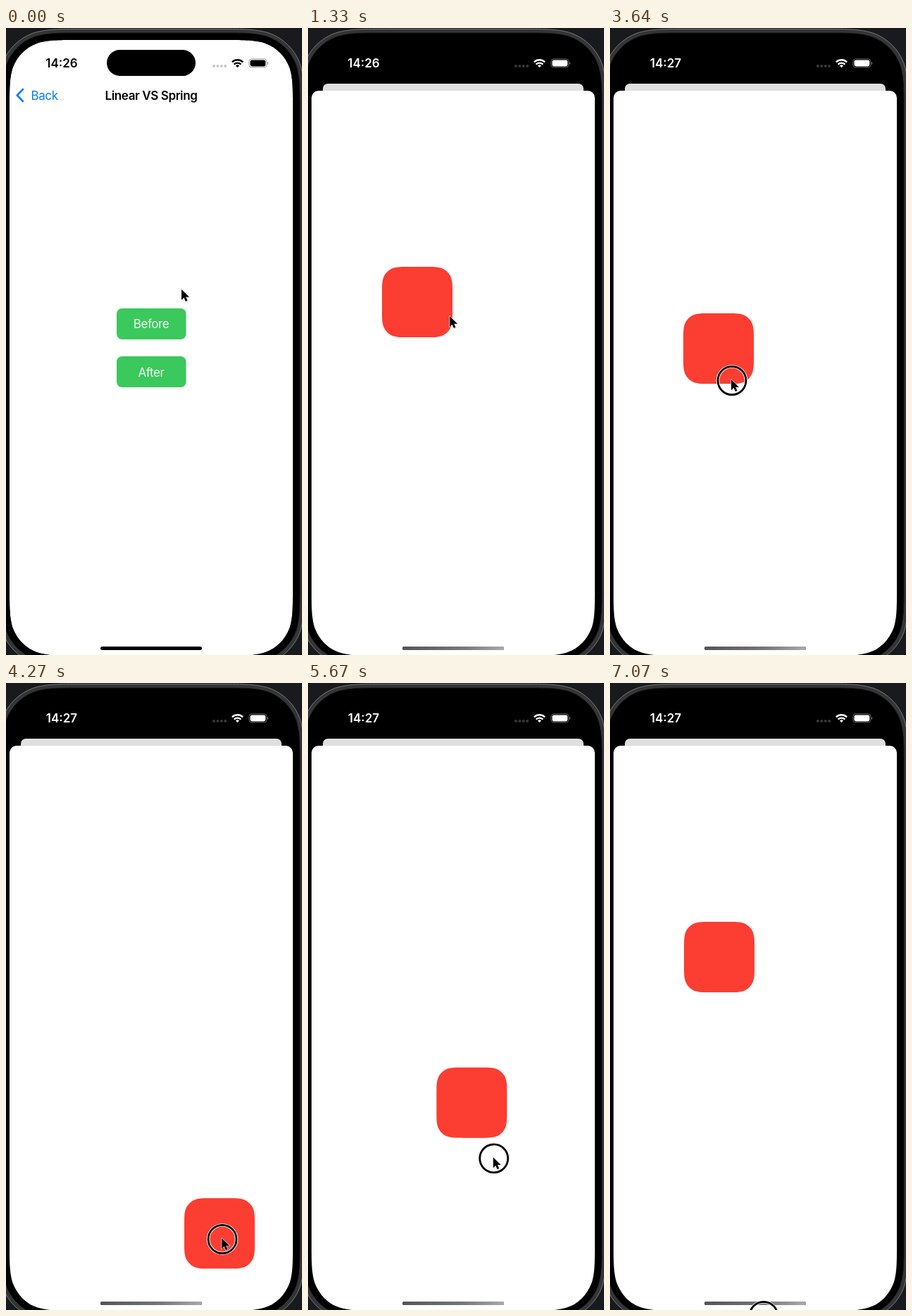
Animation, 420 px wide and 890 px high, one loop 7140 ms. Source, as an HTML page:

```html
<!DOCTYPE html>
<html lang="en">
<head>
<meta charset="utf-8">
<title>Linear VS Spring</title>
<style>
  html, body { margin: 0; width: 100%; height: 100%; overflow: hidden; background: #000; }
  svg { display: block; width: 420px; height: 890px; }
  text { font-family: Inter, Roboto, sans-serif; font-size: 17px; letter-spacing: -.4px; }
  .mid { text-anchor: middle; }
  .bold { font-weight: 600; }
</style>
</head>
<body>
<svg viewBox="0 0 420 890">
  <defs>
    <clipPath id="screenClip"><path id="screen"/></clipPath>
    <linearGradient id="barFill">
      <stop offset="0" stop-color="#555"/>
      <stop offset=".6" stop-color="#777"/>
      <stop offset="1" stop-color="#aaa"/>
    </linearGradient>
  </defs>

  <rect width="420" height="890" fill="#181a1e"/>
  <path id="frame" fill="#343536" stroke="#77797b"/>
  <path id="bezel" stroke="#151515"/>

  <g clip-path="url(#screenClip)">
    <rect width="420" height="890"/>
    <g id="page">
      <path id="pageBg" fill="#fff"/>
      <path d="M24 87L15.8 95.5L24 104" fill="none" stroke="#087cf5" stroke-width="2.6" stroke-linecap="round" stroke-linejoin="round"/>
      <text x="35.5" y="101.5" fill="#087cf5">Back</text>
      <text class="mid bold" x="206" y="101.5">Linear VS Spring</text>
      <rect x="157" y="398" width="98.5" height="44" rx="7.5" fill="#3bc85c"/>
      <rect x="157" y="466" width="98.5" height="44" rx="7.5" fill="#3bc85c"/>
      <g class="mid" fill="#fff" fill-opacity=".92">
        <text x="206" y="426">Before</text>
        <text x="206" y="494.5">After</text>
      </g>
      <path id="dim"/>
    </g>
    <rect x="143" y="31" width="126" height="37" rx="18.5"/>
    <g id="status">
      <text class="bold" id="clock" x="79" y="55.5" text-anchor="middle" style="letter-spacing:0"></text>
      <g opacity=".22">
        <circle cx="295" cy="54" r="2"/><circle cx="300.4" cy="54" r="2"/>
        <circle cx="305.8" cy="54" r="2"/><circle cx="311.2" cy="54" r="2"/>
      </g>
      <g fill="none" id="waves" stroke-width="2.3">
        <path d="M320.8 48.3a11.2 11.2 0 0 1 15.4 0"/>
        <path d="M323.6 51.6a7.2 7.2 0 0 1 9.8 0"/>
      </g>
      <path d="M328.5 56.2l-2.5-2.7a3.7 3.7 0 0 1 5 0z"/>
      <rect id="cell" x="344.9" y="43.9" width="25" height="12" rx="3.8" fill="none" stroke-opacity=".4"/>
      <rect x="346.5" y="45.4" width="21.8" height="9" rx="2.4"/>
      <path d="M371 48v4a2.2 2.2 0 0 0 0-4z" opacity=".45"/>
    </g>
    <g id="sheet">
      <path d="M5 99a10 10 0 0 1 10-10h382a10 10 0 0 1 10 10v802H5z" fill="#fff"/>
      <path id="box" fill="#fc3d32"/>
    </g>
    <rect x="134" y="878" width="144" height="5" rx="2.5"/>
    <rect id="bar" x="134" y="878" width="144" height="5" rx="2.5" fill="url(#barFill)"/>
  </g>

  <g id="pointer">
    <g id="ring" fill="none">
      <circle cx="1" cy="1.5" r="20" stroke="#fff" stroke-width="4.6"/>
      <circle cx="1" cy="1.5" r="20" stroke="#000" stroke-width="2.8"/>
    </g>
    <path d="M.8 1.2V16.4L4.4 13.1L6.8 18.3L9.6 17L7.3 12H12z" fill="#000" opacity=".2"/>
    <path d="M0 0V15L3.5 11.8L5.8 17L8.5 15.8L6.2 10.8H11z" stroke="#fff" stroke-width="1.1" paint-order="stroke"/>
  </g>
</svg>

<script>
const LOOP = 7140, STEP = 70, RETURN = 450, LAG = 70;
const HOME = [105, 339], GRAB = [49, 48];
const el = id => document.getElementById(id);
const clamp = v => Math.min(1, Math.max(0, v));
const mix = (a, b, u) => a + (b - a) * u;
const mix2 = (a, b, u) => [mix(a[0], b[0], u), mix(a[1], b[1], u)];

// Rectangle with continuous-curvature corners.
function smoothRect(x, y, w, h, r) {
  const half = [[1.5287, 0], [1.0885, 0], [.8684, 0], [.6315, .0749], [.3728, .1691]];
  const corner = half.concat(half.map(([a, b]) => [b, a]).reverse());
  const place = (fx, fy, pts) => pts.map(([a, b]) =>
    (fx ? x + w - a * r : x + a * r).toFixed(2) + ' ' + (fy ? y + h - b * r : y + b * r).toFixed(2));
  const back = corner.slice().reverse();
  return [[1, 0, corner], [1, 1, back], [0, 1, corner], [0, 0, back]]
    .map(([fx, fy, pts], i) => {
      const p = place(fx, fy, pts);
      return (i ? 'L' : 'M') + p[0] + 'C' + p.slice(1).join(' ');
    }).join('') + 'Z';
}

const linear = u => u;
const smooth = u => u * u * (3 - 2 * u);
const out = u => 1 - (1 - u) ** 1.5;

// Pointer stops: time, x, y, easing of the way there.
const stops = [
  [0, 249, 371], [100, 249, 371], [350, 217, 396, smooth],
  [520, 217, 396], [630, 201, 409, smooth], [1400, 201, 409],
  [2040, 226, 707, smooth], [2420, 226, 707], [3080, 166, 470, smooth],
  [3240, 122, 405], [3330, 135, 384], [3430, 150, 390, out], [3500, 150, 390],
  [3570, 153, 453], [3640, 172, 499], [4260, 306, 788, out],
  [5040, 306, 788], [5320, 155, 400, smooth], [5400, 155, 400],
  [5740, 276, 707, smooth], [5880, 299, 784, out],
  [6200, 299, 784], [6580, 217, 897, smooth], [LOOP, 217, 897]
];

function pointerAt(t) {
  const i = Math.max(1, stops.findIndex(s => s[0] >= t));
  const [t0, ...a] = stops[i - 1], [t1, x, y, ease = linear] = stops[i];
  return mix2(a, [x, y], ease(clamp((t - t0) / (t1 - t0))));
}

const drags = [[1400, 2320], [3540, 4455], [5400, 6042]];

function boxAt(t) {
  const drag = drags.filter(d => d[0] <= t).pop();
  if (!drag) return HOME;
  const [down, up] = drag;
  const p = pointerAt(Math.min(t, up) - LAG);
  const held = [p[0] - GRAB[0], p[1] - GRAB[1]];
  return t < up ? mix2(HOME, held, clamp((t - down) / 100))
                : mix2(held, HOME, clamp((t - up) / RETURN));
}

function sheetAt(t) {
  const s = Math.max(0, t - 690) * .0145;
  return t >= 1260 ? 1 : 1 - (1 + s) * Math.exp(-s);
}

function draw(t) {
  const p = sheetAt(t), [x, y] = pointerAt(t), [bx, by] = boxAt(t);
  const pressed = (t >= 630 && t < 700) || t >= 7070 || drags.some(d => t >= d[0] && t < d[1]);

  const page = smoothRect(5, 17, 402, 874, mix(62, 8, p));
  el('pageBg').setAttribute('d', page);
  el('dim').setAttribute('d', page);
  el('dim').setAttribute('opacity', .125 * p);
  el('page').setAttribute('transform',
    `translate(206 ${17 + 62 * p}) scale(${1 - .0796 * p}) translate(-206 -17)`);

  const g = Math.round(255 * p), ink = `rgb(${g},${g},${g})`;
  el('status').setAttribute('fill', ink);
  el('waves').setAttribute('stroke', ink);
  el('cell').setAttribute('stroke', ink);
  el('clock').textContent = t < 1680 ? '14:26' : '14:27';

  el('sheet').setAttribute('transform', `translate(0 ${802 * (1 - p)})`);
  el('box').setAttribute('transform', `translate(${bx} ${by})`);
  el('bar').setAttribute('opacity', p);
  el('pointer').setAttribute('transform', `translate(${x} ${y})`);
  el('ring').setAttribute('visibility', pressed ? 'visible' : 'hidden');
}

el('screen').setAttribute('d', smoothRect(5, 17, 402, 874, 62));
el('frame').setAttribute('d', smoothRect(-11, 1.5, 434, 905, 78));
el('bezel').setAttribute('d', smoothRect(-5, 7, 422, 894, 72));
el('box').setAttribute('d', smoothRect(0, 0, 100, 100, 25));

const start = performance.now();
function tick() {
  const t = (performance.now() - start) % LOOP;
  draw(Math.floor(t / STEP) * STEP);
  requestAnimationFrame(tick);
}
tick();
</script>
</body>
</html>
```
